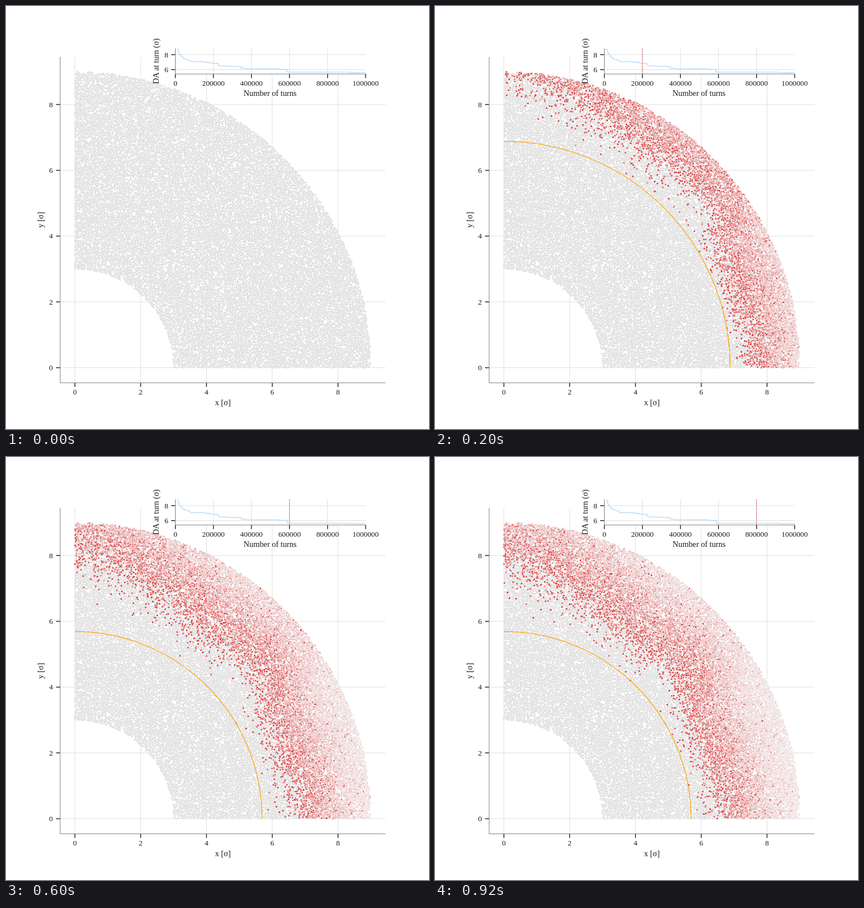
An HTML page with a canvas for the animation above (1000 ms loop, 748x748 px).

```html
<!DOCTYPE html>
<html lang="en">
<head>
<meta charset="utf-8">
<title>Dynamic aperture</title>
<style>
  html, body { margin: 0; width: 100%; height: 100%; overflow: hidden; background: #fff; }
  svg, canvas { position: absolute; left: 0; top: 0; width: 748px; height: 748px; }
  text { font-family: "Liberation Serif", "Times New Roman", serif; fill: #1a1a1a; }
</style>
</head>
<body>
<svg id="back" viewBox="0 0 748 748"></svg>
<canvas id="dots" width="748" height="748"></canvas>
<svg id="front" viewBox="0 0 748 748"></svg>
<script>
const SIZE = 748, LOOP = 1000, STEP = 200;
const UNIT = 58.17, X0 = 121.8, Y0 = 639.6;
const COUNT = 40000, R_MIN = 3, R_MAX = 9;
const back = document.getElementById("back");
const front = document.getElementById("front");
const ctx = document.getElementById("dots").getContext("2d");

const px = v => X0 + v * UNIT;
const py = v => Y0 - v * UNIT;
const insetX = turns => 299.5 + turns * 336.4;   // turns in millions
const insetY = da => 86 + (8 - da) * 13.25;

function add(parent, tag, attrs, content) {
  const el = document.createElementNS("http://www.w3.org/2000/svg", tag);
  for (const k in attrs) el.setAttribute(k, attrs[k]);
  if (content !== undefined) el.textContent = content;
  parent.appendChild(el);
  return el;
}
const line = (parent, x1, y1, x2, y2, stroke, width) =>
  add(parent, "line", { x1, y1, x2, y2, stroke, "stroke-width": width });
const label = (x, y, text, size, anchor = "middle") =>
  add(front, "text", { x, y, "font-size": size, "text-anchor": anchor }, text);
function sideLabel(x, y, text) {
  label(0, 0, text, 14.2).setAttribute("transform", `translate(${x} ${y}) rotate(-90)`);
}

const GRID = "#dcdcdc", AXIS = "#808080", TICK = "#1a1a1a";

function drawMainAxes() {
  for (let v = 0; v <= 8; v += 2) {
    line(back, px(v), 90, px(v), 666, GRID, 0.9);
    line(back, 96, py(v), 671, py(v), GRID, 0.9);
    line(front, px(v), 666, px(v), 673.5, TICK, 1.4);
    line(front, 88.5, py(v), 96, py(v), TICK, 1.4);
    label(px(v), 687, v, 13.3);
    label(83, py(v) + 4.5, v, 13.3, "end");
  }
  line(front, 95.8, 90, 95.8, 666.5, AXIS, 1);
  line(front, 95.5, 666.3, 671, 666.3, AXIS, 1);
  label(383.5, 706, "x [σ]", 14.2);
  sideLabel(65.5, 378, "y [σ]");
}

function drawInset() {
  add(front, "rect", { x: 299.5, y: 75, width: 336.5, height: 45, fill: "#fff" });
  for (let i = 0; i <= 5; i++) {
    const x = insetX(i / 5);
    if (i < 5) line(front, x, 75, x, 120, GRID, 0.9);
    line(front, x, 120, x, 127.5, TICK, 1.4);
    label(x, 140.5, i * 200000, 13.3);
  }
  for (const da of [8, 6]) {
    const y = insetY(da);
    line(front, 299.5, y, 636, y, GRID, 0.9);
    line(front, 292, y, 299.5, y, TICK, 1.4);
    label(287, y + 4.5, da, 13.3, "end");
  }
  add(front, "path", {
    d: "M303 76L305 77V80L307 85L310 87V90H312L314 92L318 94L325 96L327 98.5H352V99.6H361V101" +
       "L375 101.5V104L378 106H391V106.7H409V107.3H416V110H424V111H483V112H497V117H608V117.8H636",
    fill: "none", stroke: "#a5d0f8", "stroke-width": 1.1
  });
  line(front, 299.5, 75, 299.5, 120.5, AXIS, 1);
  line(front, 299, 120.2, 636, 120.2, AXIS, 1);
  label(467, 159, "Number of turns", 14.2);
  sideLabel(270.3, 97.5, "DA at turn (σ)");
}

let seed = 20517;
function rand() {
  seed = (seed + 0x6D2B79F5) | 0;
  let t = Math.imul(seed ^ (seed >>> 15), 1 | seed);
  t = (t + Math.imul(t ^ (t >>> 7), 61 | t)) ^ t;
  return ((t ^ (t >>> 14)) >>> 0) / 4294967296;
}
const gauss = () => Math.sqrt(-2 * Math.log(1 - rand())) * Math.cos(2 * Math.PI * rand());

// Typical loss radius after 0.2 million turns: [angle in degrees, radius]
const LOSS_EDGE = [[0, 7.7], [15, 7.55], [23, 7.5], [30, 7.7], [37, 8.2], [45, 8.15],
                   [55, 8.1], [65, 8.3], [75, 8.7], [90, 9.3]];
function lossEdge(deg) {
  const i = Math.max(1, LOSS_EDGE.findIndex(p => p[0] >= deg));
  const [a, ra] = LOSS_EDGE[i - 1], [b, rb] = LOSS_EDGE[i];
  return ra + (rb - ra) * (deg - a) / (b - a);
}

// The edge moves inwards with the logarithm of time, faster and more blurred away from the x axis.
function makeParticle() {
  const r = Math.sqrt(R_MIN ** 2 + rand() * (R_MAX ** 2 - R_MIN ** 2));
  const deg = rand() * 90, angle = deg * Math.PI / 180;
  const slope = 0.62 + 0.26 * Math.min(1, deg / 45);
  const spread = 0.36 + 0.2 * deg / 90;
  const late = rand() < 0.16 ? rand() * 1.2 : 0;
  const edge = lossEdge(deg) + gauss() * spread + late;
  return {
    r, x: px(r * Math.cos(angle)), y: py(r * Math.sin(angle)),
    lost: 0.2 * Math.exp((edge - r) / slope)
  };
}

function dot(g, p, color) {
  g.fillStyle = "#fff";
  g.beginPath();
  g.arc(p.x, p.y, 1.85, 0, 7);
  g.fill();
  g.fillStyle = color;
  g.beginPath();
  g.arc(p.x, p.y, 1.52, 0, 7);
  g.fill();
}

function lossColor(k) {
  const mix = (a, b) => Math.round(a + (b - a) * k);
  return `rgb(${mix(238, 214)},${mix(229, 39)},${mix(229, 40)})`;
}

function makeLayer(paint) {
  const c = document.createElement("canvas");
  c.width = c.height = SIZE;
  paint(c.getContext("2d"));
  return c;
}

const APERTURE = [0, 6.88, 6.12, 5.69, 5.69];
const particles = Array.from({ length: COUNT }, makeParticle);
const base = makeLayer(g => particles.forEach(p => dot(g, p, "#dadada")));
const layers = APERTURE.map((da, i) => i === 0 ? base : makeLayer(g => {
  const turns = i / 5;
  g.drawImage(base, 0, 0);
  for (const p of particles)
    if (p.lost <= turns && p.r >= da) dot(g, p, lossColor(p.lost / turns));
}));

drawMainAxes();
drawInset();
const arc = add(front, "path", { fill: "none", stroke: "#ffa500", "stroke-width": 1.25 });
const marker = line(front, 0, 75, 0, 120, "#d62728", 0.8);
marker.setAttribute("stroke-dasharray", "3 1.3");

let shown = -1;
function render(time) {
  const i = Math.floor((time % LOOP) / STEP);
  if (i === shown) return;
  shown = i;
  ctx.clearRect(0, 0, SIZE, SIZE);
  ctx.drawImage(layers[i], 0, 0);
  const r = APERTURE[i] * UNIT;
  arc.setAttribute("d", i ? `M${X0} ${Y0 - r}A${r} ${r} 0 0 1 ${X0 + r} ${Y0}` : "");
  marker.setAttribute("x1", insetX(i / 5));
  marker.setAttribute("x2", insetX(i / 5));
  marker.setAttribute("visibility", i ? "visible" : "hidden");
}

function tick() {
  render(performance.now());
  requestAnimationFrame(tick);
}
tick();
</script>
</body>
</html>
```
